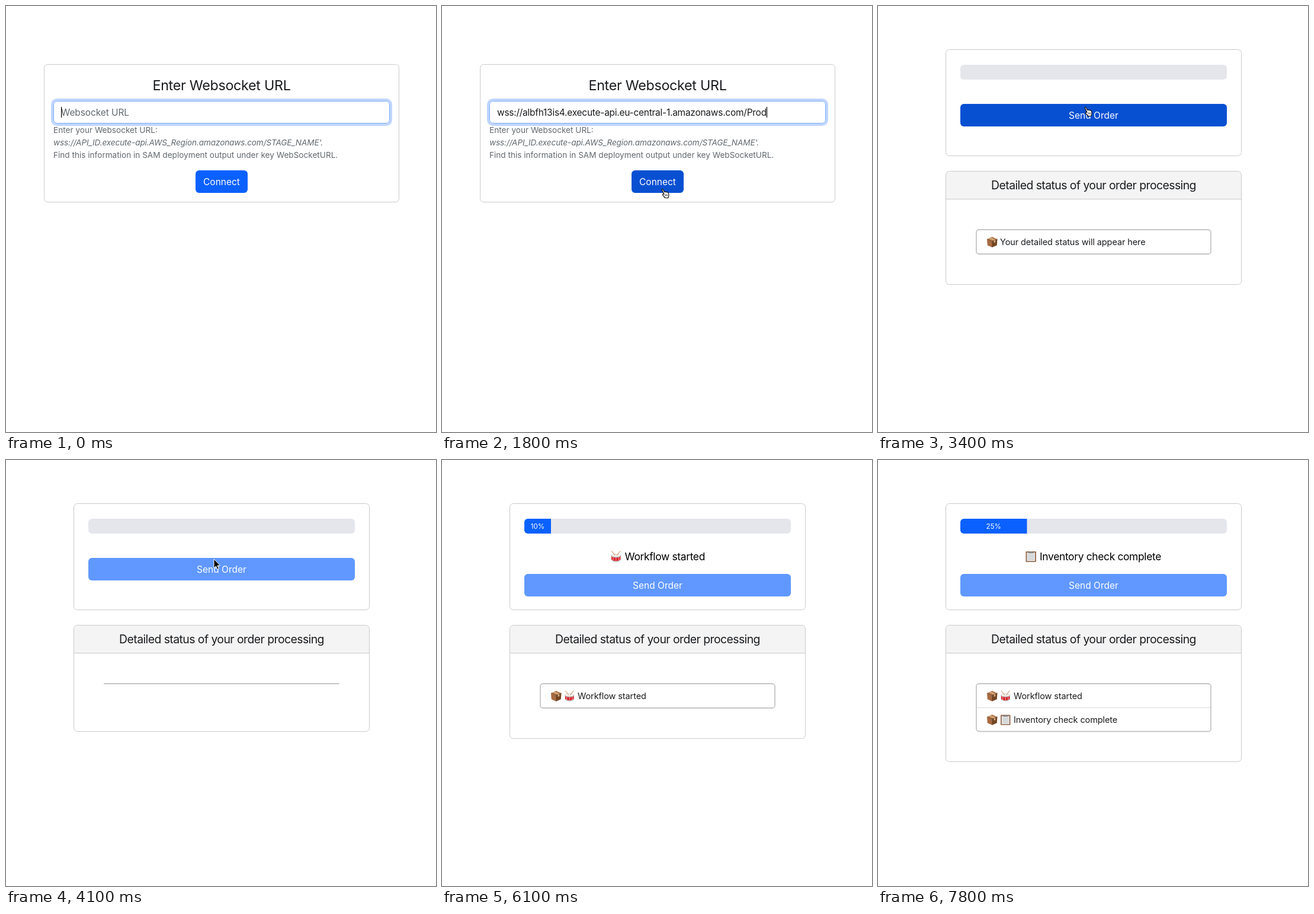
Animation of 726 by 718 pixels, one loop 8000 ms. Source, as an HTML page:

```html
<!DOCTYPE html>
<html lang="en">
<head>
<meta charset="utf-8">
<title>Order status</title>
<style>
  html, body { margin: 0; width: 100%; height: 100%; overflow: hidden; background: #fff; }
  svg { display: block; }
  text { font: 15.5px Inter, "Open Sans", sans-serif; font-optical-sizing: none; fill: #1a1c1f; }
  .mid { text-anchor: middle; }
  .title { font-size: 23.3px; letter-spacing: -.3px; }
  .heading { font-size: 19.4px; letter-spacing: -.56px; }
  .help { font-size: 13.6px; fill: #62686e; }
  .italic { font-style: italic; letter-spacing: -.12px; }
  .value { letter-spacing: -.26px; }
  .placeholder { fill: #62686e; letter-spacing: -.1px; }
  .row { font-size: 14.5px; letter-spacing: -.1px; }
  .message { font-size: 17.4px; letter-spacing: -.33px; fill: #000; }
  .percent { font-size: 11.6px; }
  .light { fill: #fff; }
  .card { fill: none; stroke: #cacaca; }
  .cursor { stroke-linejoin: round; }
</style>
</head>
<body>
<svg width="726" height="718" viewBox="0 0 726 718">
  <defs>
    <symbol id="box" viewBox="0 0 20 20" overflow="visible">
      <path d="M1 5 10 8.5V19.2L1.8 15.6Z" fill="#a96b42"/>
      <path d="M19 5 10 8.5V19.2L18.2 15.6Z" fill="#744523"/>
      <path d="M1 5 10 1 19 5 10 8.8Z" fill="#b97d50"/>
      <path d="M4.2 3.6 6.6 2.5 15.6 6.4V10.4L13 11.4V7.5Z" fill="#d9b48c"/>
      <path d="M1 5 10 8.8 19 5M10 8.8V19" fill="none" stroke="#5b351c" stroke-width=".7"/>
    </symbol>
    <symbol id="drum" viewBox="0 0 20 20" overflow="visible">
      <path d="M2 8.5V16Q10 22 18 16V8.5Z" fill="#d9252b"/>
      <path d="M2 15.2Q10 21 18 15.2V17Q10 22.2 2 17Z" fill="#b9bcc0"/>
      <path d="M5 11V17M10 12V18.6M15 11V17" stroke="#f0b6b0" stroke-width="1"/>
      <ellipse cx="10" cy="8.8" rx="8.6" ry="3.3" fill="#b9bcc0"/>
      <ellipse cx="10" cy="8.2" rx="7.6" ry="2.5" fill="#f4f1ec"/>
      <path d="M2.5 .8 8.5 8M17.5 .8 11.5 8" stroke="#c89b6c" stroke-width="1.1" stroke-linecap="round"/>
    </symbol>
    <symbol id="clipboard" viewBox="0 0 20 20" overflow="visible">
      <rect x="1" y="1.2" width="18" height="18.6" rx="1.4" fill="#9a7155"/>
      <path d="M3 3.5H17V18H3Z" fill="#e4e5e6"/>
      <path d="M5 7.5H15M5 10H15M5 12.5H15M5 15H15" stroke="#b9bcbf" stroke-width=".8"/>
      <path d="M6 4.6V2.6H8.2Q10-.8 11.8 2.6H14V4.6Z" fill="#85898d"/>
    </symbol>
  </defs>

  <g id="connectPage">
    <rect class="card" x="64.5" y="98.5" width="599" height="232" rx="6"/>
    <text class="title mid" x="364" y="142">Enter Websocket URL</text>
    <rect id="ring" x="78" y="158" width="572" height="42" rx="8" fill="none" stroke="#bfd5fe" stroke-width="4"/>
    <rect id="input" x="80.5" y="160.5" width="567" height="37" rx="6" fill="#fff"/>
    <text id="inputText" x="93" y="185"></text>
    <rect id="caret" y="170" width="1.2" height="18" fill="#000"/>
    <text class="help" x="80" y="214">Enter your Websocket URL:</text>
    <text class="help italic" x="80" y="235">wss://API_ID.execute-api.AWS_Region.amazonaws.com/STAGE_NAME'.</text>
    <text class="help" x="80" y="256">Find this information in SAM deployment output under key WebSocketURL.</text>
    <rect id="connect" x="320" y="277" width="88" height="38" rx="6"/>
    <text class="light mid" x="364" y="302">Connect</text>
  </g>

  <g id="orderPage">
    <rect class="card" x="114.5" y="73.5" width="499" height="179" rx="6"/>
    <clipPath id="track"><rect x="139" y="99" width="450" height="25" rx="6"/></clipPath>
    <clipPath id="filled"><rect id="filledArea" x="139" y="99" height="25"/></clipPath>
    <g clip-path="url(#track)">
      <rect x="139" y="99" width="450" height="25" fill="#e5e6ec"/>
      <g clip-path="url(#filled)">
        <rect x="139" y="99" width="450" height="25" fill="#0b61ff"/>
        <text id="percent" class="percent light mid" y="116"></text>
      </g>
    </g>
    <g id="message">
      <use id="messageIcon" y="152.5" width="19.5" height="20"/>
      <text id="messageText" class="message" y="169"></text>
    </g>
    <g id="send">
      <rect id="sendButton" x="139" y="165" width="450" height="38" rx="6"/>
      <text class="light mid" x="364" y="190">Send Order</text>
    </g>
    <path d="M115 325V284.5Q115 279 120.500 279H607.500Q613 279 613 284.500V325Z" fill="#f4f4f4"/>
    <path d="M115 325.5H613" stroke="#cacaca"/>
    <rect id="details" class="card" x="114.5" y="278.5" width="499" rx="6"/>
    <text class="heading mid" x="364" y="309">Detailed status of your order processing</text>
    <rect id="list" x="166" y="377" width="396" rx="4.500" fill="none" stroke="#c6c6c6" stroke-width="1.800"/>
    <path id="divider" d="M167 417.5H561" stroke="#d8d8d8"/>
    <g id="waiting">
      <use href="#box" x="183" y="388" width="19.5" height="19.500"/>
      <text class="row" x="206" y="403">Your detailed status will appear here</text>
    </g>
    <g id="started">
      <use href="#box" x="183" y="388" width="19.5" height="19.500"/>
      <use href="#drum" x="206" y="388" width="18.5" height="19.500"/>
      <text class="row" x="229" y="403">Workflow started</text>
    </g>
    <g id="checked">
      <use href="#box" x="183" y="428" width="19.5" height="19.500"/>
      <use href="#clipboard" x="206" y="428" width="18.5" height="19.500"/>
      <text class="row" x="229" y="443">Inventory check complete</text>
    </g>
  </g>

  <g id="mouse" class="cursor">
    <path id="arrow" d="M0 0V15L3.500 11.800 5.900 17.300 8.300 16.300 5.900 10.900H10.600Z" stroke="#fff"/>
    <path id="beam" d="M-3-7Q0-7 0-5 0-7 3-7M0-5V7M-3 8.500Q0 8.500 0 6.500 0 8.500 3 8.500M-1.500 2H1.500" fill="none" stroke="#111" stroke-width="1.200"/>
    <g id="hand" transform="translate(-4 1)" stroke="#111" stroke-width="1.200">
      <path d="M5 9.600 1.200 2.400Q1 .8 2.600 1L6 6.200Q7.400 5 8.400 6.200 9.600 5.400 10.600 6.600 12.400 6.400 12.600 8.200L13 12 11.800 16H6.800L3 11.600Q2 9.800 3.400 9.400Z" fill="#fff"/>
      <path d="M6.800 10V13M8.700 10V13M10.600 10V13" stroke-width=".8"/>
    </g>
  </g>
</svg>

<script>
const LOOP = 8000, STEP = 100;
const SWITCH = 2200, PRESS = 3800, CLEAR = 3900, STARTED = 4900, CHECKED = 7200;
const URL_TEXT = 'wss://albfh13is4.execute-api.eu-central-1.amazonaws.com/Prod';
const BLUE = [11, 97, 255], HOVER = [8, 80, 210], ACTIVE = [8, 74, 196];

// time, x, y
const mousePath = [
  [300, 470, 200], [700, 380, 255], [1100, 288, 298], [1200, 290, 312], [1400, 316, 312],
  [1500, 335, 309], [1700, 374, 306.5], [3000, 374, 306.5], [3100, 372, 290],
  [3200, 364, 235], [3300, 356, 186], [3400, 352, 168.500], [3600, 351, 167],
  [4400, 351, 167], [4500, 190, 208], [4600, 13, 259]
];

const $ = id => document.getElementById(id);
const show = (id, on) => $(id).style.display = on ? '' : 'none';
const set = (id, attrs) => { for (const name in attrs) $(id).setAttribute(name, attrs[name]); };
const clamp = p => Math.max(0, Math.min(1, p));
const mix = (a, b, p) => a + (b - a) * p;
const mixColor = (a, b, p) => `rgb(${a.map((v, i) => Math.round(mix(v, b[i], p)))})`;

// CSS "ease" timing: cubic-bezier(.25, .1, .25, 1)
function ease(p) {
  if (p <= 0 || p >= 1) return clamp(p);
  let lo = 0, hi = 1;
  for (let i = 0; i < 20; i++) {
    const m = (lo + hi) / 2, n = 1 - m;
    if (.75 * m * n * n + .75 * m * m * n + m ** 3 < p) lo = m; else hi = m;
  }
  return .3 * lo * (1 - lo) ** 2 + 3 * lo * lo * (1 - lo) + lo ** 3;
}
const transition = (t, start, length) => ease(clamp((t - start) / length));

function mouseAt(t) {
  const next = mousePath.findIndex(point => point[0] > t);
  if (next < 0) return mousePath.at(-1).slice(1);
  const [t0, x0, y0] = mousePath[next - 1], [t1, x1, y1] = mousePath[next];
  const p = (t - t0) / (t1 - t0);
  return [mix(x0, x1, p), mix(y0, y1, p)];
}

function drawMouse(t) {
  const visible = t >= 300 && t < 4700;
  show('mouse', visible);
  if (!visible) return;
  const kind = t < 1500 ? 'arrow' : t < SWITCH ? 'hand' : t < 3200 ? 'beam'
    : t >= 3300 && t < CLEAR ? 'hand' : 'arrow';
  for (const id of ['arrow', 'beam', 'hand']) show(id, id === kind);
  set('mouse', { transform: `translate(${mouseAt(t)})` });
}

function drawConnectPage(t) {
  const pasted = t >= 100, blur = transition(t, 1950, 150);
  const field = $('inputText');
  field.textContent = pasted ? URL_TEXT : 'Websocket URL';
  field.setAttribute('class', pasted ? 'value' : 'placeholder');
  set('caret', { x: 93 + (pasted ? field.getComputedTextLength() : 0) });
  show('caret', t < 2000 && !(t >= 700 && t < 1300));
  set('ring', { opacity: 1 - blur });
  set('input', { stroke: mixColor([125, 172, 250], [216, 220, 225], blur) });
  set('connect', { fill: mixColor(BLUE, HOVER, transition(t, 1450, 150)) });
}

function drawOrderPage(t) {
  const cleared = t >= CLEAR, started = t >= STARTED, checked = t >= CHECKED;
  const width = 45 * transition(t, STARTED, 600) + 67.5 * transition(t, CHECKED, 600);
  set('filledArea', { width });
  set('percent', { x: 139 + width / 2 });
  $('percent').textContent = checked ? '25%' : started ? '10%' : '';

  show('message', started);
  const left = checked ? 248.5 : 284;
  set('messageIcon', { href: checked ? '#clipboard' : '#drum', x: left });
  set('messageText', { x: left + 24.5 });
  $('messageText').textContent = checked ? 'Inventory check complete' : 'Workflow started';

  set('send', { transform: `translate(0 ${started ? 27 : 0})` });
  set('sendButton', {
    fill: cleared ? mixColor(ACTIVE, BLUE, transition(t, 3850, 150))
      : t >= PRESS ? mixColor(HOVER, ACTIVE, 1)
      : mixColor(BLUE, HOVER, transition(t, 3250, 150)),
    opacity: cleared ? .65 : 1
  });

  const empty = cleared && !started;
  set('details', { height: checked ? 230 : empty ? 179 : 191 });
  set('list', { height: checked ? 80.5 : empty ? .01 : 41 });
  show('divider', checked);
  show('waiting', !cleared);
  show('started', started);
  show('checked', checked);
}

function draw(now) {
  const t = Math.floor(now % LOOP / STEP) * STEP;
  const connecting = t < SWITCH;
  show('connectPage', connecting);
  show('orderPage', !connecting);
  (connecting ? drawConnectPage : drawOrderPage)(t);
  drawMouse(t);
}

const begin = performance.now();
function tick() {
  draw(performance.now() - begin);
  requestAnimationFrame(tick);
}
tick();
</script>
</body>
</html>
```
